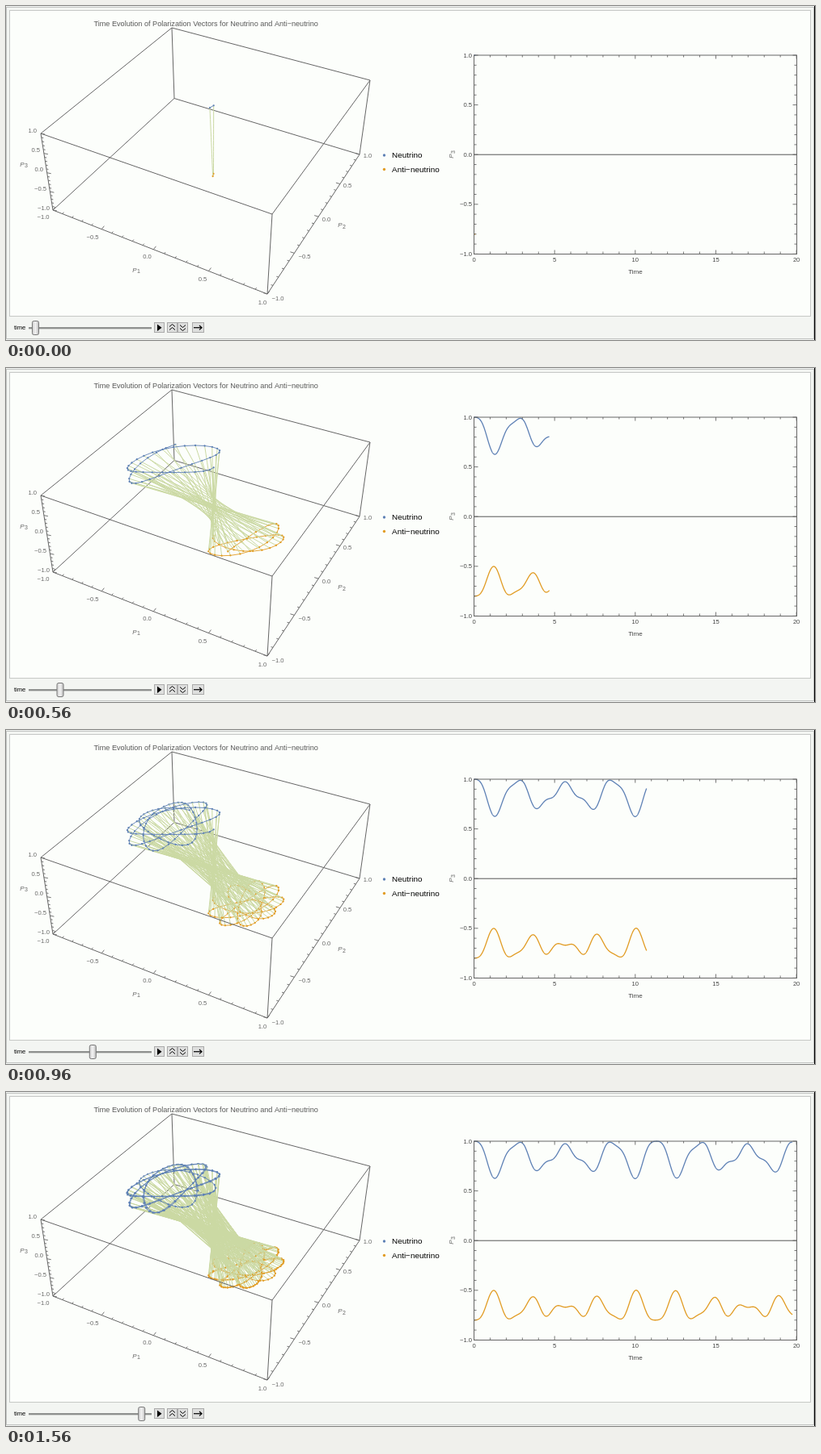
An HTML page with a canvas that plays this animation: 1000 px wide and 414 px high, repeating every 1600 ms.

```html
<!DOCTYPE html>
<html>
<head>
<meta charset="utf-8">
<style>
html, body { margin: 0; width: 100%; height: 100%; overflow: hidden; background: #f3f5f2 }
canvas { display: block }
</style>
</head>
<body>
<canvas id="stage" width="1000" height="414"></canvas>
<script>
const g = document.getElementById('stage').getContext('2d');
const BLUE = '#5e81b5', GOLD = '#e19c24', GREEN = 'rgb(203,217,163)', INK = '#666';

// Coupled precession: P' = (B + mu S) x P, A' = (-B + mu S) x A, with S = P + A
const MU = 3, MIX = 26 * Math.PI / 180, DT = 0.01;
const B = [Math.sin(MIX), 0, -Math.cos(MIX)];
const cross = (a, b) => [a[1] * b[2] - a[2] * b[1], a[2] * b[0] - a[0] * b[2], a[0] * b[1] - a[1] * b[0]];
const axpy = (s, k, h) => s.map((v, i) => v + h * k[i]);
function rate(s) {
  const p = s.slice(0, 3), a = s.slice(3);
  const field = sign => B.map((b, i) => sign * b + MU * (p[i] + a[i]));
  return [...cross(field(1), p), ...cross(field(-1), a)];
}
function rk4(s) {
  const k1 = rate(s), k2 = rate(axpy(s, k1, DT / 2)), k3 = rate(axpy(s, k2, DT / 2)), k4 = rate(axpy(s, k3, DT));
  return s.map((v, i) => v + DT / 6 * (k1[i] + 2 * k2[i] + 2 * k3[i] + k4[i]));
}
const states = [[0, 0, 1, 0, 0, -0.8]];
while (states.length <= 2000) states.push(rk4(states[states.length - 1]));

// Perspective view of the box; depth grows away from the viewer
const depth = ([x, y, z]) => 1 - 0.0566 * x + 0.1052 * y - 0.0244 * z;
function project(p) {
  const [x, y, z] = p, w = depth(p);
  return [(256.56 + 112.46 * x + 95.86 * y - 6.14 * z) / w, (171.25 + 31.13 * x - 56.58 * y - 50.9 * z) / w];
}
const mix = (a, b, k) => a.map((v, i) => v + (b[i] - v) * k);

function path(pts, color, width = 1) {
  g.beginPath();
  pts.forEach(p => g.lineTo(...p));
  g.strokeStyle = color;
  g.lineWidth = width;
  g.stroke();
}
function dot([x, y], color, r) {
  g.fillStyle = color;
  g.beginPath();
  g.arc(x, y, r, 0, 7);
  g.fill();
}

// Every 0.1 time units: a joining line in pieces, two curve pieces and two dots, far to near
const CUTS = 12, LIFT = 0.001;
const parts = [];
function addLine(step, a, b, color, width, lift = 0) {
  const ends = [project(a), project(b)];
  parts.push({ step, z: depth(mix(a, b, 0.5)) - lift, paint: () => path(ends, color, width) });
}
for (let i = 0; i <= 200; i++) {
  const split = s => [s.slice(0, 3), s.slice(3)];
  const now = split(states[i * 10]), last = split(states[Math.max(0, i - 1) * 10]);
  for (let k = 0; k < CUTS; k++) addLine(i, mix(...now, k / CUTS), mix(...now, (k + 1) / CUTS), GREEN, 1);
  [BLUE, GOLD].forEach((color, j) => {
    if (i) addLine(i, last[j], now[j], color, 0.9, LIFT);
    const at = project(now[j]);
    parts.push({ step: i, z: depth(now[j]) - 2 * LIFT, paint: () => dot(at, color, 1.15) });
  });
}
parts.sort((a, b) => b.z - a.z);

function text(s, x, y, size = 7.6, align = 'center', color = INK, style = '') {
  g.font = `${style} ${size}px "Liberation Sans", Arial, sans-serif`;
  g.textAlign = align;
  g.textBaseline = 'alphabetic';
  g.fillStyle = color;
  g.fillText(s, x, y);
}
function symbol(n, x, y) {
  text('P', x - 2, y, 8, 'center', INK, 'italic');
  text(n, x + 3, y + 1.5, 7);
}
function rect(x, y, w, h, fill, line) {
  g.fillStyle = fill;
  g.fillRect(x, y, w, h);
  g.strokeStyle = line;
  g.lineWidth = 1;
  g.strokeRect(x, y, w, h);
}
const num = v => v.toFixed(1).replace('-', '−');

const T = { a: [43, 158], b: [329, 258], c: [450, 92], d: [205, 27] };
const F = { a: [58, 253], b: [323, 357], c: [437, 184], d: [208, 114.5] };

function ticks(p, q, wp, wq, dx, dy) {
  for (let i = 0; i <= 20; i++) {
    const u = wp * (1 - i / 20), v = wq * i / 20;
    const x = (p[0] * u + q[0] * v) / (u + v), y = (p[1] * u + q[1] * v) / (u + v);
    const k = i % 5 ? 0.5 : 1;
    path([[x, y], [x + dx * k, y + dy * k]], INK, 0.9);
  }
}

function panel() {
  g.fillStyle = '#f3f5f2';
  g.fillRect(0, 0, 1000, 414);
  g.strokeStyle = '#c0c2c0';
  g.lineWidth = 1;
  g.strokeRect(0.5, 1.5, 998, 411);
  rect(4.5, 5.5, 990, 379, '#fcfefb', '#c6c8c6');
  g.fillStyle = '#000';
  g.fillRect(999, 0, 1, 414);
}

function boxBack() {
  [T.d, F.a, F.c].forEach(p => path([F.d, p], INK));
}

function boxFront() {
  path([T.a, T.b, T.c, T.d, T.a, F.a, F.b, F.c, T.c], INK);
  path([T.b, F.b], INK);
  ticks(F.a, F.b, 0.976, 0.863, 3, -4);
  ticks(F.b, F.c, 0.863, 1.073, -5, -1.5);
  ticks(F.a, T.a, 0.976, 0.927, 5, 1);
  const at = [[46, 264], [107, 288.5], [174.5, 313], [243, 340.5], [317, 369.5]];
  const side = [[336, 364.5], [369, 313], [396, 267], [422, 225], [447, 188]];
  for (let i = 0; i < 5; i++) {
    const s = num(i / 2 - 1);
    text(s, ...at[i]);
    text(s, ...side[i]);
    text(s, 54 - 4 * i, 253 - 24 * i, 7.6, 'right');
  }
  symbol(1, 161, 329.5);
  symbol(2, 415, 274);
  symbol(3, 22, 198.5);
  text('Time Evolution of Polarization Vectors for Neutrino and Anti−neutrino', 108.5, 25.4, 9.12, 'left', '#585858');
  dot([467.5, 185], BLUE, 1.7);
  dot([467.5, 202.5], GOLD, 1.7);
  text('Neutrino', 477, 188, 9.95, 'left', '#000');
  text('Anti−neutrino', 477, 205.5, 9.95, 'left', '#000');
}

const px = t => 578.5 + 19.93 * t, py = v => 184.2 - 123.2 * v;

function chart(t) {
  const n = Math.min(2000, Math.round(t / DT));
  const trace = k => states.slice(0, n + 1).map((s, i) => [px(i * DT), py(s[k])]);
  path([[578.5, py(0)], [977, py(0)]], '#555');
  path(trace(2), BLUE, 1.3);
  path(trace(5), GOLD, 1.3);
  g.strokeStyle = INK;
  g.lineWidth = 1;
  g.strokeRect(578.5, 61, 399, 246.5);
  for (let i = 0; i <= 20; i++) {
    const x = px(i), y = py(i / 10 - 1), m = i % 5 ? 2.5 : 4.5;
    path([[x, 307], [x, 307 - m]], INK, 0.9);
    path([[x, 61], [x, 61 + m]], INK, 0.9);
    path([[579, y], [579 + m, y]], INK, 0.9);
    path([[977, y], [977 - m, y]], INK, 0.9);
    if (i % 5 == 0) {
      text(i, x, 317, 7.6, 'center', '#444');
      text(num(i / 10 - 1), 576, y + 2.5, 7.6, 'right', '#444');
    }
  }
  text('Time', 778, 331.5, 8.1, 'center', '#444');
  g.save();
  g.translate(553, 184);
  g.rotate(-Math.PI / 2);
  symbol(3, 0, 0);
  g.restore();
}

function controls(t) {
  text('time', 10, 401, 7.5, 'left', '#000');
  g.fillStyle = '#8e908e';
  g.fillRect(28, 398, 152, 2);
  g.fillStyle = '#d2d4d2';
  g.fillRect(28, 400, 152, 1);
  const x = 35.8 + 6.68 * t;
  const shade = g.createLinearGradient(x - 4, 0, x + 4, 0);
  shade.addColorStop(0, '#cfcfcf');
  shade.addColorStop(0.5, '#f2f2f2');
  shade.addColorStop(1, '#bdbdbd');
  g.beginPath();
  g.roundRect(x - 4, 390.5, 8, 17, 2);
  g.fillStyle = shade;
  g.fill();
  g.strokeStyle = '#777';
  g.lineWidth = 1;
  g.stroke();
  [[183.5, 12], [199.5, 12], [212.5, 12], [230.5, 14]].forEach(([b, w]) => rect(b, 392.5, w, 12, '#dedfde', '#aaa'));
  g.beginPath();
  g.moveTo(187, 394.5);
  g.lineTo(192.5, 398.8);
  g.lineTo(187, 403);
  g.fillStyle = '#000';
  g.fill();
  for (const y of [397.5, 401.5]) {
    path([[202, y], [205.5, y - 3], [209, y]], '#000');
    path([[215, y - 2], [218.5, y + 1], [222, y - 2]], '#000');
  }
  path([[232, 398.7], [242, 398.7]], '#000', 1.2);
  path([[239, 396], [242, 398.7], [239, 401.4]], '#000', 1.2);
}

let shown = -1;
function draw(now) {
  requestAnimationFrame(draw);
  const step = Math.floor(now % 1600 / 40);
  if (step == shown) return;
  shown = step;
  const t = step < 7 ? 0.1 : 0.45 + 0.603 * (step - 7);
  const count = Math.floor(t * 10 + 1e-6);
  panel();
  boxBack();
  for (const p of parts) if (p.step <= count) p.paint();
  boxFront();
  chart(t);
  controls(t);
}
requestAnimationFrame(draw);
</script>
</body>
</html>
```
